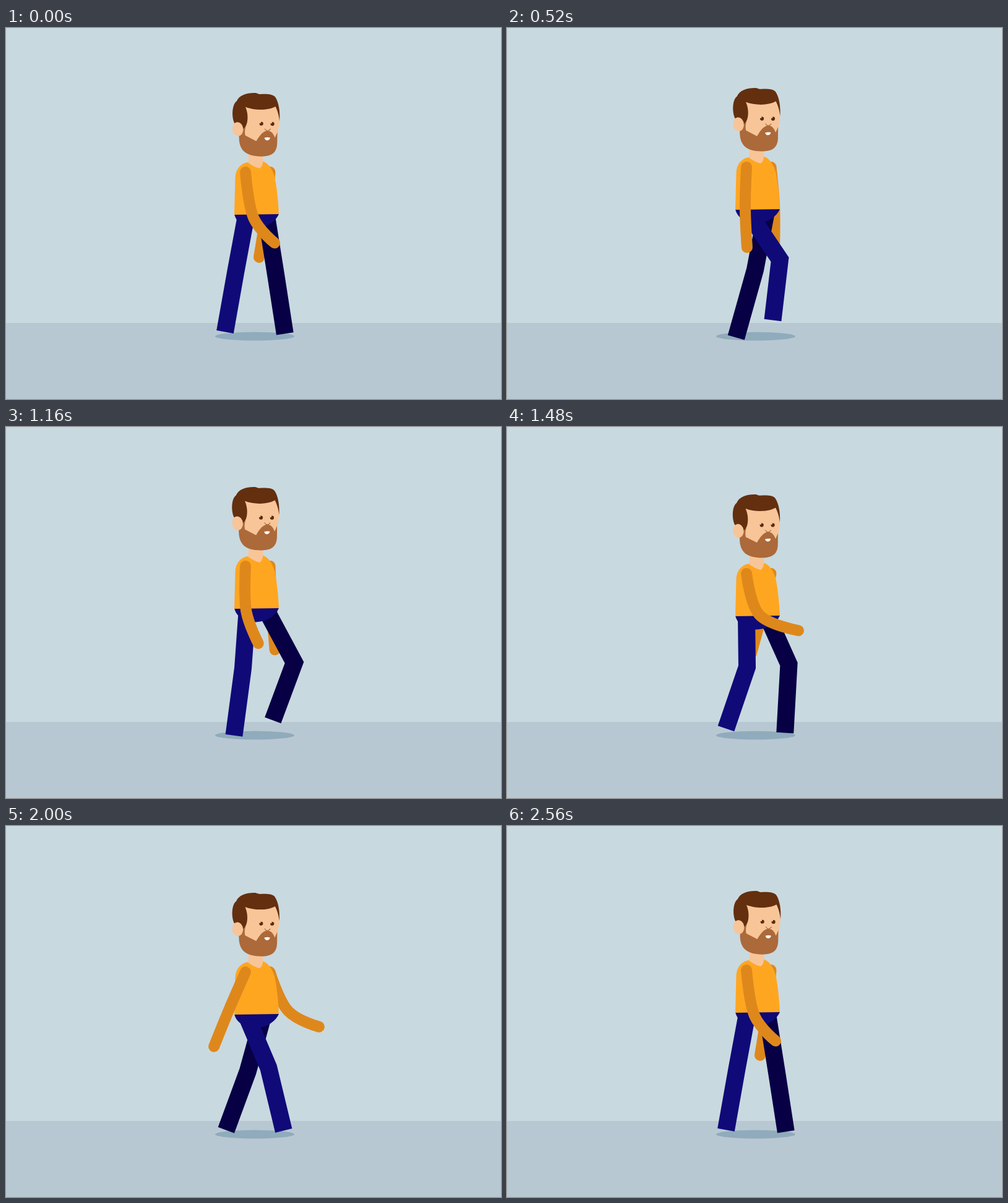
Write an HTML page with a canvas that moves like this. It is 800 px wide and 600 px high and loops after 2.6 s.

```html
<!DOCTYPE html>
<html lang="en">
<head>
<meta charset="utf-8">
<title>Walk cycle</title>
<style>
  html, body { margin: 0; width: 100%; height: 100%; overflow: hidden; background: #c9d9e0; }
  canvas { display: block; width: 800px; height: 600px; }
</style>
</head>
<body>
<canvas id="stage" width="800" height="600"></canvas>
<script>
const ctx = document.getElementById('stage').getContext('2d');

const FRAME_MS = 40, LOOP_FRAMES = 65, CYCLE = 32, STEP = 16;
const COLOR = {
  wall: '#c9d9e0', floor: '#b8c8d2', shadow: '#90abbc',
  skin: '#f7c598', hair: '#632f0f', beard: '#ac693a', eye: '#5a2a10',
  shirt: '#ffa621', sleeve: '#de881c', nearLeg: '#100a78', farLeg: '#080045'
};

// Periodic monotone cubic through (times, values): no overshoot at the extremes.
function track(times, values, period) {
  const n = times.length;
  const time = i => times[(i + n) % n] + Math.floor(i / n) * period;
  const value = i => values[(i + n) % n];
  const rate = i => (value(i + 1) - value(i)) / (time(i + 1) - time(i));
  const tangent = i => {
    const a = rate(i - 1), b = rate(i);
    return a * b <= 0 ? 0 : 2 * a * b / (a + b);
  };
  return t => {
    t %= period;
    let i = n - 1;
    while (time(i) > t) i--;
    const h = time(i + 1) - time(i), u = (t - time(i)) / h, v = 1 - u;
    return value(i) * (1 + 2 * u) * v * v + tangent(i) * h * u * v * v
      + value(i + 1) * u * u * (3 - 2 * u) - tangent(i + 1) * h * u * u * v;
  };
}

const tracks = (times, lists, period) => {
  const result = {};
  for (const key in lists) result[key] = track(times, lists[key], period);
  return result;
};

const body = tracks([0, 4, 5, 7, 9, 12, 13], {
  y: [-4, 0.6, 0, -6.9, -10.7, -12.6, -12.1],
  tilt: [1, 0.1, 0, -0.35, -0.2, 0.2, 0.35]
}, STEP);

const LEG_TIMES = [0, 5, 7, 10, 13, 16, 21, 23, 29];
const foot = tracks(LEG_TIMES, {
  x: [354, 354, 356.5, 389, 429.5, 449, 447.5, 423.5, 368.5],
  y: [491.5, 487.8, 467.4, 458, 472.5, 492.5, 492.8, 498.3, 498.8]
}, CYCLE);
const nearLeg = tracks(LEG_TIMES, {
  hip: [388.5, 387, 387, 387, 386.5, 387, 390, 394, 390],
  x: [371.5, 388, 418, 443, 441, 417, 437.5, 417.5, 383],
  y: [393, 388, 384, 373, 374.5, 392, 388, 399, 390]
}, CYCLE);
const farLeg = tracks(LEG_TIMES, {
  hip: [420.5, 420.5, 420.5, 420, 419.7, 418, 414, 416.4, 419],
  x: [435.9, 455.5, 433, 417, 401, 387, 405, 426.8, 466],
  y: [398, 383.5, 396, 394, 391, 395, 398.5, 388.1, 381]
}, CYCLE);

// Angles in degrees from straight down, forward positive.
const ARM_TIMES = [0, 4, 5, 13, 20, 21, 23];
const nearArm = tracks(ARM_TIMES, {
  upper: [10.4, 18, 17.4, -1.8, -27.6, -26.6, -21],
  upperLength: [77, 70, 70, 65, 65, 65, 64],
  lower: [40.5, 70.5, 68, 2.6, -25.5, -24.2, -14.9],
  lowerLength: [51, 68, 68, 65, 66, 66, 66]
}, CYCLE);
const farArm = tracks(ARM_TIMES, {
  upper: [-5.5, -13, -12.5, 5, 29, 28, 21.6],
  upperLength: [66, 65, 65, 64, 72, 72, 73],
  lower: [-8.8, -15.5, -15, 0, 77, 74, 50],
  lowerLength: [73, 68, 68, 62, 54, 54, 51]
}, CYCLE);

function fill(color, path) {
  ctx.fillStyle = color;
  ctx.fill(typeof path === 'string' ? new Path2D(path) : path);
}

function ellipse(color, x, y, rx, ry = rx, angle = 0) {
  const path = new Path2D();
  path.ellipse(x, y, rx, ry, angle, 0, Math.PI * 2);
  fill(color, path);
}

function stroke(color, width, cap, draw) {
  ctx.strokeStyle = color;
  ctx.lineWidth = width;
  ctx.lineCap = cap;
  ctx.lineJoin = 'miter';
  ctx.beginPath();
  draw();
  ctx.stroke();
}

function drawLeg(leg, phase, waist, color, footPhase, shift) {
  stroke(color, 28, 'butt', () => {
    ctx.moveTo(leg.hip(phase), waist);
    ctx.lineTo(leg.x(phase), leg.y(phase));
    ctx.lineTo(foot.x(footPhase) + shift, foot.y(footPhase) + shift);
  });
}

function drawArm(arm, phase, x, y) {
  const rad = Math.PI / 180, handle = 22;
  const a = arm.upper(phase) * rad, b = arm.lower(phase) * rad;
  const elbowX = x + Math.sin(a) * arm.upperLength(phase);
  const elbowY = y + Math.cos(a) * arm.upperLength(phase);
  const handX = elbowX + Math.sin(b) * arm.lowerLength(phase);
  const handY = elbowY + Math.cos(b) * arm.lowerLength(phase);
  const dx = Math.sin((a + b) / 2) * handle, dy = Math.cos((a + b) / 2) * handle;
  stroke(COLOR.sleeve, 18, 'round', () => {
    ctx.moveTo(x, y);
    ctx.bezierCurveTo(x, y, elbowX - dx, elbowY - dy, elbowX, elbowY);
    ctx.bezierCurveTo(elbowX + dx, elbowY + dy, handX, handY, handX, handY);
  });
}

function drawTorso() {
  fill(COLOR.shirt, 'M369 306 L370.5 246 C371 232 380 222 392 221 L416 220 ' +
    'C424 223 431 233 434.5 246 C438 264 440 285 441 305 Z');
  fill(COLOR.skin, 'M392 200 H415.5 V220 C415 225 413 229 410 231 C404 230 397 226 391.5 222 Z');
}

function drawEye(x, y) {
  ellipse(COLOR.eye, x, y, 3.1);
  ellipse(COLOR.skin, x - 2, y - 2, 1.4);
}

function drawHead(tilt) {
  ctx.save();
  ctx.translate(403, 216);
  ctx.rotate(tilt * Math.PI / 180);
  ctx.translate(-403, -216);
  fill(COLOR.skin, 'M384 128 H434 C438 136 441 146 441 155 L437.5 182 L420 196 L384 186 Z');
  fill(COLOR.beard, 'M376 174 L384 163 L386.5 164 C385 169 385 174 386 178 L404 187 ' +
    'C408 180 413 172 420 170 C427 169 431 173 434 181 L437.8 172 V188 ' +
    'C438 204 431 211.5 412 211.5 C388 211.5 376 203 376 180 Z');
  fill(COLOR.hair, 'M368 158 C363 147 364 128 371 123 C375 113 387 109 400 109 ' +
    'C405 109 405 111 410 110.8 C420 110.2 431 110.5 434 116 C439 124 442 138 441 154 ' +
    'C440 145 437 136 434 130.5 C421 138 399 137 385.5 132 C390 141 391 156 386 164 L380 170 Z');
  ellipse(COLOR.skin, 373.8, 168, 8.8, 11.2, -0.12);
  drawEye(411.7, 158.6);
  drawEye(429.6, 158.6);
  stroke(COLOR.beard, 1.2, 'round', () => {
    ctx.moveTo(417.5, 167);
    ctx.quadraticCurveTo(422, 173, 426.5, 167);
  });
  fill('#fff', 'M417 181.2 Q421.5 180 426.2 180.8 C426 186.5 418 187 417 181.2 Z');
  ctx.restore();
}

function drawScene(phase) {
  const dy = body.y(phase), waist = 305.5 + dy, shoulder = 237 + dy;
  ctx.fillStyle = COLOR.wall;
  ctx.fillRect(0, 0, 800, 600);
  ctx.fillStyle = COLOR.floor;
  ctx.fillRect(0, 477, 800, 123);
  ellipse(COLOR.shadow, 402, 498.7, 64, 6.9);

  drawArm(farArm, phase, 426.5, shoulder);
  drawLeg(farLeg, phase, waist, COLOR.farLeg, phase + STEP, 1.8);
  ctx.save();
  ctx.translate(0, dy);
  fill(COLOR.nearLeg, 'M369 305 C372 319 386 327.5 405 327.5 C424 326 436 316 441 305 Z');
  ctx.restore();
  drawLeg(nearLeg, phase, waist, COLOR.nearLeg, phase, 0);
  ctx.save();
  ctx.translate(0, dy);
  drawTorso();
  drawHead(body.tilt(phase));
  ctx.restore();
  drawArm(nearArm, phase, 387, shoulder);
}

function tick() {
  const frame = Math.floor((performance.now() - start) / FRAME_MS + 0.01) % LOOP_FRAMES;
  drawScene(frame % CYCLE);
  requestAnimationFrame(tick);
}

const start = performance.now();
tick();
</script>
</body>
</html>
```
